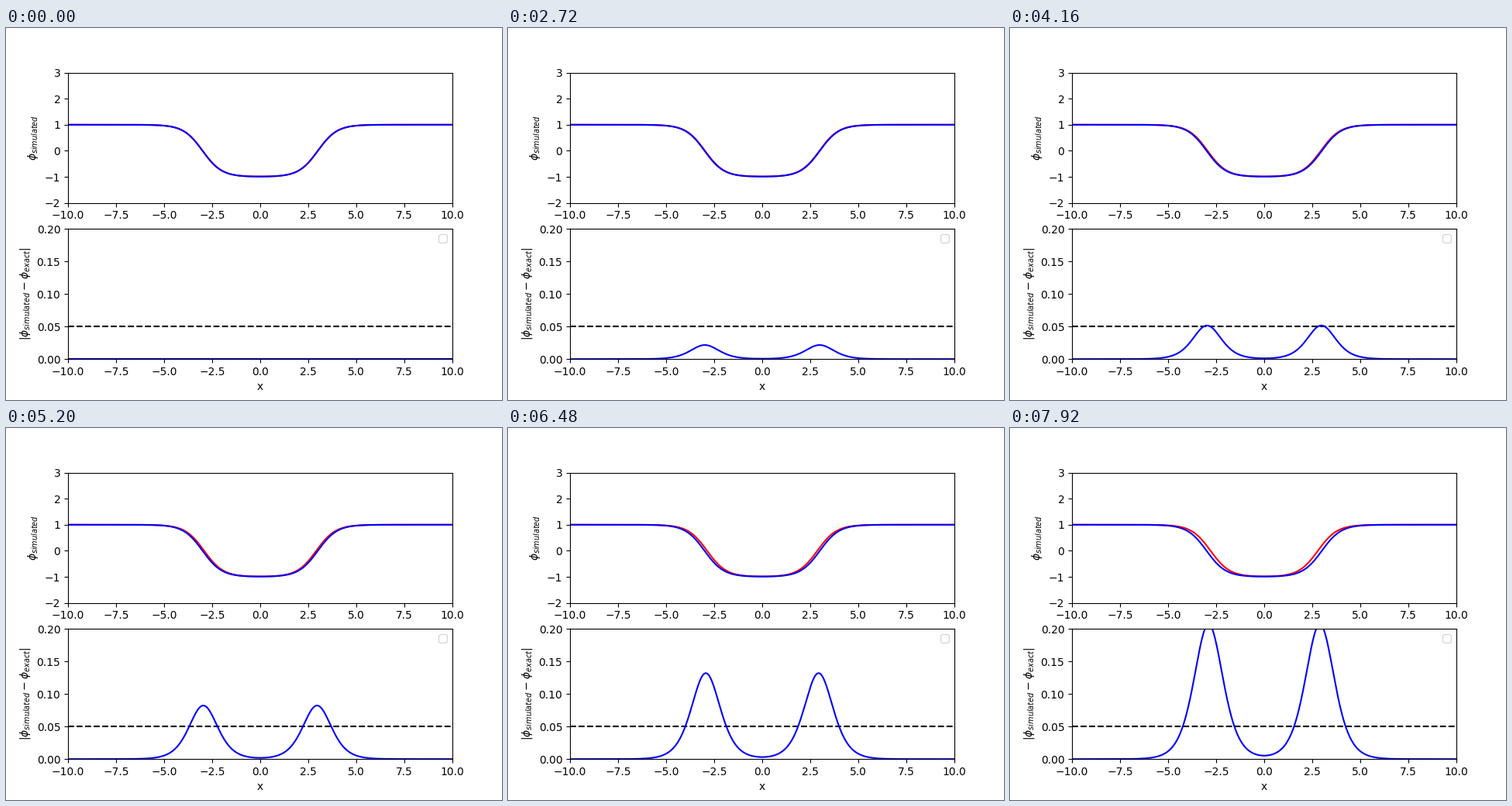
Recreate the animation shown at these times as a matplotlib script. Size 640x480 px, loop 8000 ms.

```python
import numpy as np
import matplotlib.pyplot as plt
from matplotlib.animation import FuncAnimation

FRAMES, INTERVAL = 100, 80
STEPS_PER_FRAME = 40
DT = 0.5 / STEPS_PER_FRAME

x = np.linspace(-10, 10, 1001)
dx = x[1] - x[0]
exact = 1 + np.tanh(x - 3) - np.tanh(x + 3)


def acceleration(phi):
    """Right side of the phi^4 field equation, with fixed ends."""
    acc = np.zeros_like(phi)
    inner = phi[1:-1]
    acc[1:-1] = (phi[2:] - 2 * inner + phi[:-2]) / dx**2 + 2 * inner * (1 - inner**2)
    return acc


def simulate():
    """Let the kink pair go from rest; keep one field per frame."""
    phi, velocity = exact.copy(), np.zeros_like(x)
    acc = acceleration(phi)
    history = [phi.copy()]
    for _ in range(FRAMES - 1):
        for _ in range(STEPS_PER_FRAME):
            velocity += 0.5 * DT * acc
            phi += DT * velocity
            acc = acceleration(phi)
            velocity += 0.5 * DT * acc
        history.append(phi.copy())
    return history


fields = simulate()

fig, (ax_field, ax_error) = plt.subplots(2, 1, figsize=(6.4, 4.8), dpi=100)

field_line, = ax_field.plot(x, fields[0], "r")
ax_field.plot(x, exact, "b")
ax_field.set(xlim=(-10, 10), ylim=(-2, 3), ylabel=r"$\phi_{simulated}$")

ax_error.plot(x, np.full_like(x, 0.05), "k--")
error_line, = ax_error.plot(x, np.zeros_like(x), "b")
ax_error.set(xlim=(-10, 10), ylim=(0, 0.2), xlabel="x",
             ylabel=r"$|\phi_{simulated} - \phi_{exact}|$")
ax_error.legend(handles=[], loc="upper right")


def update(frame):
    field_line.set_ydata(fields[frame])
    error_line.set_ydata(np.abs(fields[frame] - exact))
    return field_line, error_line


anim = FuncAnimation(fig, update, frames=FRAMES, interval=INTERVAL,
                     repeat=True, repeat_delay=0)
plt.show()
```
